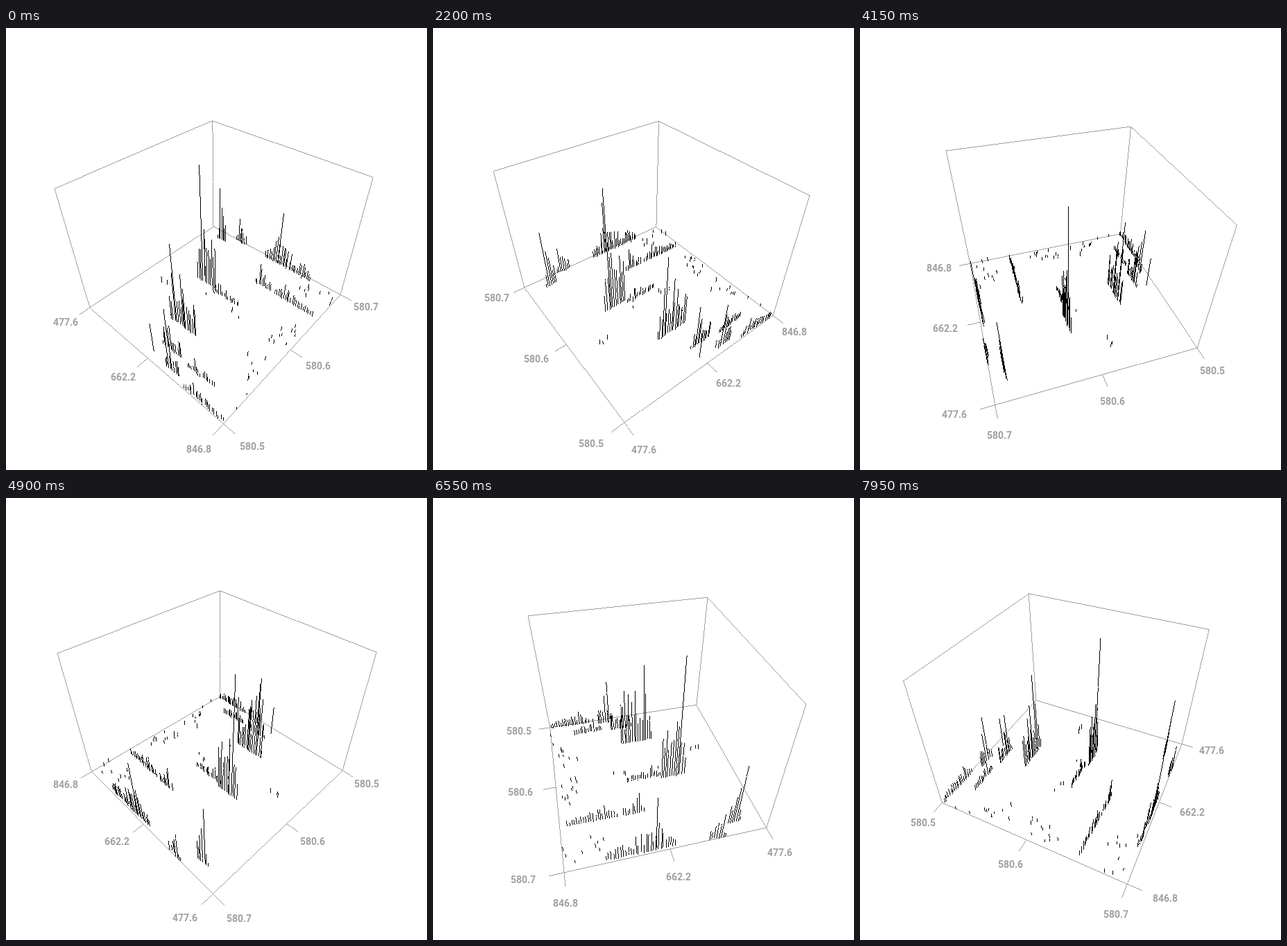
Recreate the animation shown at these times as an HTML page with a canvas. Size 607 px wide and 637 px high, loop 8 s.

```html
<!DOCTYPE html>
<html lang="en">
<head>
<meta charset="utf-8">
<title>Rotating spike plot</title>
<style>
  html, body { margin: 0; width: 100%; height: 100%; overflow: hidden; background: #fff; }
  canvas { display: block; }
</style>
</head>
<body>
<canvas id="stage" width="607" height="637"></canvas>
<script>
const ctx = document.getElementById('stage').getContext('2d');
const LOOP = 8000, STEP = 50;
const START = 41.95, SPEED = 36;      // degrees, degrees per second
const HX = 0.984, HY = 1.015;         // half sides of the floor
const TICK = 0.13, LABEL = 0.3;
const GAP = 0.024;                    // distance between spikes in a row
const GREY = '#a0a0a0';
const X_TEXT = ['477.6', '662.2', '846.8'];
const Y_TEXT = ['580.5', '580.6', '580.7'];

let seed = 7;
function random(low = 0, high = 1) {
  seed = (seed * 16807) % 2147483647;
  return low + (high - low) * seed / 2147483647;
}

// x and y run from -1 to 1 over the floor, height from 0 to 1.
const spikes = [];
function spike(x, y, height) {
  spikes.push({ x: x * HX, y: y * HY, height });
}

// Row of spikes that climbs to its peak in the first quarter, then fades.
function row(y, from, to, high) {
  const count = Math.round((to - from) / GAP);
  const top = Math.round(count / 4);
  for (let i = 0; i <= count; i++) {
    const t = (i - top) / count;
    const shape = t < 0 ? 1 + 3 * t : Math.exp(-1.2 * t);
    const share = i === top ? 1 : random(0.3, 0.95);
    const x = from + GAP * (i + (i === top ? 0 : random(-0.3, 0.3)));
    spike(x, y + random(-0.012, 0.012), Math.max(0.03, high * shape * share));
  }
}

function dust(x0, x1, y0, y1, count) {
  for (let i = 0; i < count; i++) {
    spike(random(x0, x1), random(y0, y1), random(0.02, 0.045));
  }
}

row(0.86, -0.79, -0.64, 0.51);
row(0.99, -0.57, -0.39, 0.23);
row(0.137, -0.43, -0.16, 1);
row(0.1, -0.16, 0.22, 0.11);
row(-0.502, -0.22, 0.16, 0.7);
row(-0.785, -0.02, 0.24, 0.37);
row(-0.93, 0.19, 0.38, 0.4);
row(-0.8, 0.36, 0.7, 0.13);
row(-0.985, 0.5, 0.98, 0.13);
row(0.97, -0.06, 0.62, 0.26);
row(0.525, 0.14, 0.36, 0.2);
row(0.52, 0.42, 0.92, 0.14);
spike(0.13, 0.975, 0.49);
spike(-0.02, -0.907, 0.27);
dust(0.74, 0.97, -0.08, 0.28, 11);
dust(0.6, 1, -0.85, -0.25, 10);
dust(0.5, 1, 0.7, 0.97, 10);
dust(-1, -0.4, -0.25, -0.18, 3);
dust(-0.2, 0.45, -0.05, 0.1, 5);

let cos = 1, sin = 0;

// Floor point turned about the vertical axis: u to the right, v to the viewer.
function turn(x, y) {
  return [x * cos + y * sin, x * sin - y * cos];
}

function project(x, y, z) {
  const [u, v] = turn(x, y);
  const scale = 576 / (4.5 - 0.7763 * v - 0.96 * z);
  return [304 + scale * u, 309.3 + scale * (0.655 + 0.626 * v - 1.188 * z)];
}

// Crisp one-pixel line without smoothing.
function line(a, b) {
  const dx = b[0] - a[0], dy = b[1] - a[1];
  const n = Math.max(1, Math.round(Math.max(Math.abs(dx), Math.abs(dy))));
  for (let i = 0; i <= n; i++) {
    ctx.fillRect(Math.round(a[0] + dx * i / n), Math.round(a[1] + dy * i / n), 1, 1);
  }
}

function drawBox(sx, sy) {
  const x = sx * HX, y = sy * HY;     // front corner
  const ring = [[x, y], [-x, y], [-x, -y], [x, -y]];
  const floor = ring.map(c => project(c[0], c[1], 0));
  const roof = ring.map(c => project(c[0], c[1], 1));
  for (let i = 0; i < 4; i++) line(floor[i], floor[(i + 1) % 4]);
  for (let i = 1; i < 4; i++) line(floor[i], roof[i]);
  line(roof[1], roof[2]);
  line(roof[2], roof[3]);
}

// Tick and label, pointing outwards along (ox, oy).
function drawMark(text, x, y, ox, oy) {
  line(project(x, y, 0), project(x + ox * TICK, y + oy * TICK, 0));
  const [du, dv] = turn(ox, oy);
  const side = Math.abs(du);
  const push = 12 * Math.max(0, (side - 0.6) / 0.4) - 2 * Math.min(1, side * 4);
  const [px, py] = project(x + ox * LABEL, y + oy * LABEL, 0);
  ctx.fillText(text, Math.round(px + Math.sign(du) * push), Math.round(py - 2.5 * dv * dv + 5));
}

function draw(ms) {
  const angle = (START - SPEED * ms / 1000) * Math.PI / 180;
  cos = Math.cos(angle);
  sin = Math.sin(angle);
  const sx = Math.sign(sin) || 1, sy = -Math.sign(cos) || 1;

  ctx.fillStyle = '#fff';
  ctx.fillRect(0, 0, 607, 637);
  ctx.fillStyle = GREY;
  ctx.font = 'bold 14px Roboto, sans-serif';
  ctx.textAlign = 'center';
  drawBox(sx, sy);
  for (let i = 0; i < 3; i++) {
    drawMark(X_TEXT[i], (i - 1) * HX, sy * HY, 0, sy);
    drawMark(Y_TEXT[i], sx * HX, (i - 1) * HY, sx, 0);
  }

  ctx.fillStyle = '#000';
  for (const { x, y, height } of spikes) {
    line(project(x, y, 0), project(x, y, height));
  }
}

let shown = -1;
function tick() {
  const ms = Math.floor((performance.now() % LOOP) / STEP) * STEP;
  if (ms !== shown) {
    shown = ms;
    draw(ms);
  }
  requestAnimationFrame(tick);
}
tick();
</script>
</body>
</html>
```
